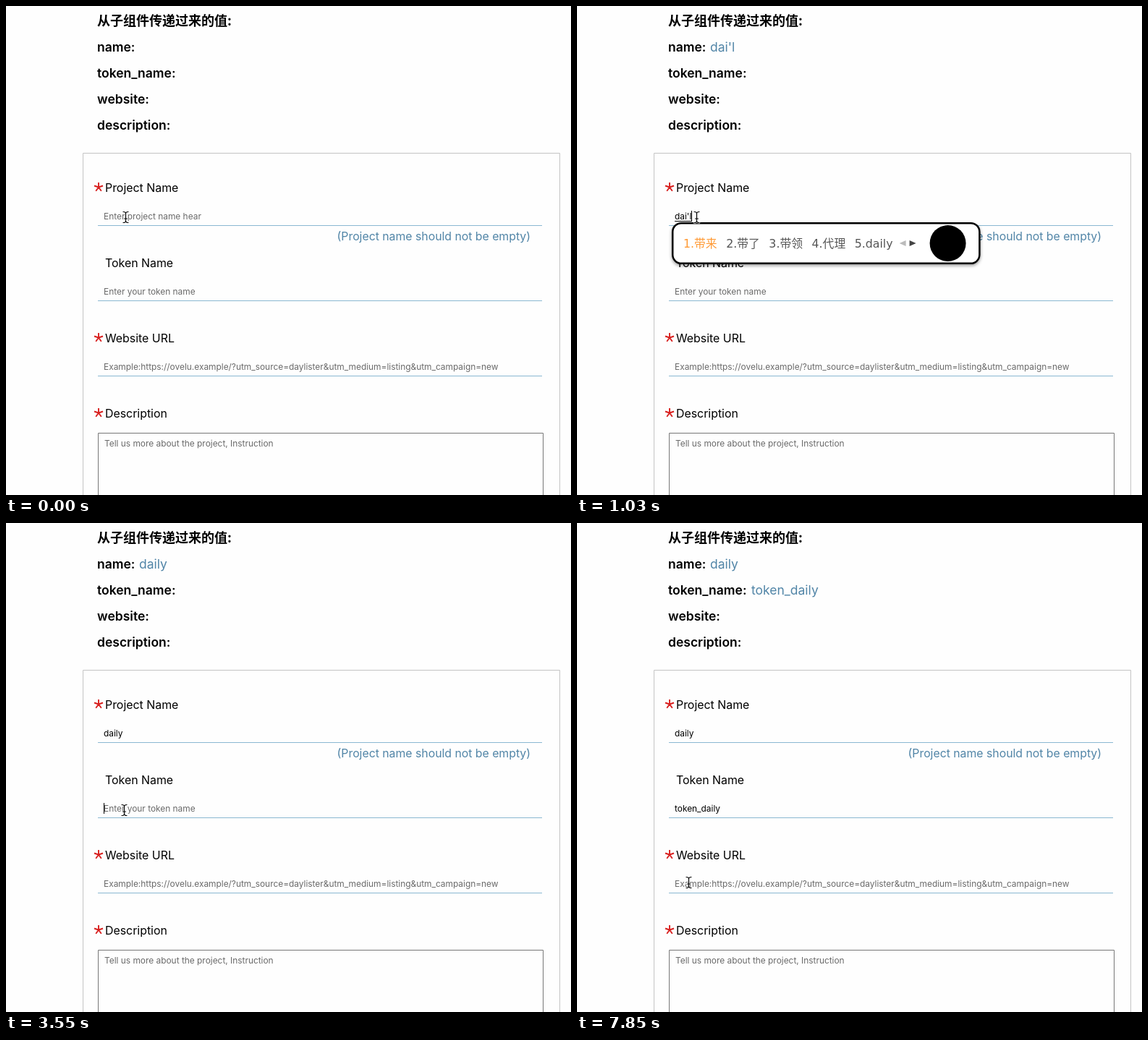
Recreate the animation shown at these times as an HTML page. Size 781x676 px, loop 8 s.

```html
<!DOCTYPE html>
<html lang="zh">
<head>
<meta charset="utf-8">
<title>Form binding</title>
<style>
  html, body { margin: 0; height: 100%; overflow: hidden; background: #fefefe; }
  svg { display: block; width: 781px; height: 676px; font: 15.9px Inter, 'Noto Sans CJK SC', sans-serif; }
  .head { font-size: 17.5px; font-weight: 600; }
  .title { font: 700 18px 'Noto Sans CJK SC', sans-serif; }
  .blue { fill: #5185a7; }
  .value { font-size: 17.5px; }
  .hint { font-size: 15.8px; }
  .small { font-size: 11.9px; }
  .pale { fill: #6a6a6a; }
  .line { fill: none; stroke: #8ab8d2; }
  .frame { fill: none; stroke: #c4c4c4; }
  .area { fill: none; stroke: #777; }
  .star { fill: none; stroke: #d8201f; stroke-width: 1.9; }
  #ime text { font: 15.8px 'DejaVu Sans', 'Noto Sans CJK SC', sans-serif; fill: #555; }
  #ime tspan:first-child { fill: #f93; }
  #panel { fill: #fff; stroke: #000; stroke-width: 2.5; filter: drop-shadow(0 2px 2px #0006); }
</style>
</head>
<body>
<svg viewBox="0 0 781 676">
  <defs>
    <path id="star" class="star" d="M0 0V-6.5M0 0L-6-2M0 0L6-2M0 0L-3.8 5.3M0 0L3.8 5.3"/>
    <path id="beamShape" d="M-3.5-7.5Q0-7.5 0-5Q0-7.5 3.5-7.5M0-5V5M-3.5 7.5Q0 7.5 0 5Q0 7.5 3.5 7.5M-2 2H2"/>
  </defs>

  <text class="title" x="126" y="27">从子组件传递过来的值:</text>
  <g class="head">
    <text x="126" y="63">name:</text>
    <text x="126" y="99">token_name:</text>
    <text x="126" y="135">website:</text>
    <text x="126" y="171">description:</text>
  </g>
  <text class="blue value" id="nameValue" x="184" y="63"></text>
  <text class="blue value" id="tokenValue" x="241" y="99"></text>

  <path class="frame" d="M106.5 676V203.5H765.5V676"/>
  <path class="line" d="M127 303.5H741M127 407.5H741M127 511.5H741"/>
  <path class="area" d="M127.5 676V590.5H742.5V676"/>

  <use href="#star" x="128" y="250.5"/>
  <use href="#star" x="128" y="458.5"/>
  <use href="#star" x="128" y="562.5"/>
  <text x="137" y="257">Project Name</text>
  <text x="137" y="361">Token Name</text>
  <text x="137" y="465">Website URL</text>
  <text x="137" y="569">Description</text>
  <text class="blue hint" x="725" y="324" text-anchor="end">(Project name should not be empty)</text>

  <g class="small">
    <text id="nameInput" x="135" y="295"></text>
    <text id="tokenInput" x="135" y="399"></text>
    <text class="pale" x="135" y="503">Example:https://ovelu.example/?utm_source=daylister&amp;utm_medium=listing&amp;utm_campaign=new</text>
    <text class="pale" x="136" y="609">Tell us more about the project, Instruction</text>
  </g>
  <rect id="underline" x="135" y="297" height="1"/>
  <rect id="caret" width="1" height="15"/>

  <g id="ime">
    <rect id="panel" x="132.2" y="300.2" height="55.6" rx="12"/>
    <text id="candidates" x="147" y="334"></text>
    <g id="tail">
      <path fill="#bbb" d="M-112 328L-103 324V332Z"/>
      <path fill="#444" d="M-89 328L-98 324V332Z"/>
      <circle cx="-45" cy="328" r="25"/>
    </g>
  </g>

  <g id="beam" fill="none" stroke-linecap="round">
    <use href="#beamShape" stroke="#fff" stroke-opacity=".8" stroke-width="2.6"/>
    <use href="#beamShape" stroke="#000" stroke-width="1.2"/>
  </g>
  <path id="arrow" stroke="#fff" style="filter:drop-shadow(0 1px 1px #0006)"
    d="M0 0V14L3.2 11L5.5 16.5L8 15.4L5.8 10.2H10Z"/>
</svg>
<script>
const LOOP = 8000;
const $ = id => document.getElementById(id);

// Each track lists [start time, value]; a value holds until the next one.
const tracks = {
  name: [[0, ''], [290, 'd'], [590, 'da'], [740, 'dai'], [1030, "dai'l"], [1320, "dai'l'y"], [1470, 'daily']],
  token: [[0, ''], [4590, 't'], [4890, 'to'], [5180, 'tok'], [5330, 'toke'], [5630, 'token'], [6070, 'token_'],
    [6370, 'token_d'], [6520, 'token_da'], [6660, 'token_dai'], [6960, 'token_dail'], [7260, 'token_daily']],
  words: [[0, ''], [290, '的 都 到 对 大'], [590, '大 打 达 答 daily'], [740, '带 代 待 (#`O′) daily'],
    [1030, '带来 带了 带领 代理 daily'], [1320, '带来压 代理业 带路用 带领员 daily'], [1470, '']],
  caret: [[0, ''], [290, 'name'], [1920, ''], [2510, 'token'], [2950, ''], [3550, 'token'], [4000, ''],
    [4440, 'token'], [7560, '']],
  pointer: [[0, ['beam', 165.5, 292]], [1770, ['arrow', 172, 315]], [1920, ['arrow', 167, 345]],
    [2060, ['arrow', 157, 382]], [2210, ['arrow', 150.5, 408]], [2360, ['beam', 163.5, 397]],
    [7560, ['arrow', 160, 430]], [7710, ['beam', 156, 488]], [7850, ['beam', 154.5, 497]]],
};
const valueAt = (track, t) => tracks[track].findLast(([start]) => start <= t)[1];

function setField(field, text, placeholder) {
  const input = $(field + 'Input');
  $(field + 'Value').textContent = text;
  input.textContent = text || placeholder;
  input.classList.toggle('pale', !text);
  return text ? Math.round(135 + input.getComputedTextLength()) : 135;
}

function drawCandidates(words) {
  $('ime').style.display = $('underline').style.display = words ? '' : 'none';
  if (!words) return;
  $('candidates').innerHTML = words.split(' ')
    .map((word, i) => `<tspan dx="${i ? 12.5 : 0}">${i + 1}.${word}</tspan>`).join('');
  const last = $('candidates').lastChild;
  const right = last.getEndPositionOfChar(last.getNumberOfChars() - 1).x + 121;
  $('panel').setAttribute('width', right - 133.4);
  $('tail').setAttribute('transform', `translate(${right})`);
}

function render(t) {
  const ends = {
    name: setField('name', valueAt('name', t), 'Enter project name hear'),
    token: setField('token', valueAt('token', t), 'Enter your token name'),
  };
  drawCandidates(valueAt('words', t));
  $('underline').setAttribute('width', ends.name - 135);

  const focus = valueAt('caret', t);
  $('caret').style.display = focus ? '' : 'none';
  $('caret').setAttribute('x', ends[focus] ?? 0);
  $('caret').setAttribute('y', focus === 'name' ? 283 : 387);

  const [shape, x, y] = valueAt('pointer', t);
  for (const id of ['beam', 'arrow']) $(id).style.display = id === shape ? '' : 'none';
  $(shape).setAttribute('transform', `translate(${x} ${y})`);
}

const begin = performance.now();
function tick() {
  render((performance.now() - begin) % LOOP);
  requestAnimationFrame(tick);
}
tick();
</script>
</body>
</html>
```
